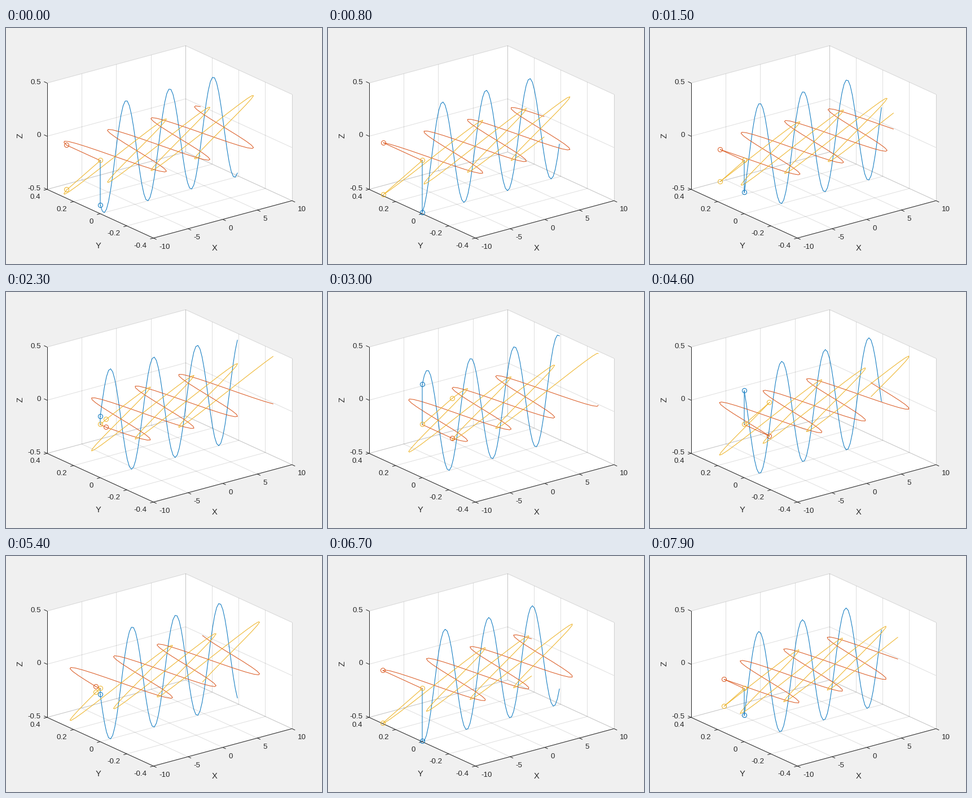
These frames come from a looping animation (560x420 px, 8 s). A matplotlib script:

```python
import numpy as np
import matplotlib.pyplot as plt
from matplotlib.animation import FuncAnimation

W, H, DPI = 560, 420, 100
PX = 72 / DPI                      # points per pixel
INK = "#262626"
BLUE, RED, YELLOW = "#0072BD", "#D95319", "#EDB120"
FRAMES, INTERVAL = 80, 100

plt.rcParams["font.family"] = "Liberation Sans"

# Orthographic view stretched to fill the plot box
AZ, EL = np.radians(37.5), np.radians(30)
LEFT, BOTTOM, BOX_W, BOX_H = 72.8, 373.8, 434, 342.3
horiz = np.array([np.cos(AZ), np.sin(AZ)])
vert = np.array([np.sin(AZ) * np.sin(EL), np.cos(AZ) * np.sin(EL), np.cos(EL)])
XW, YW = BOX_W * horiz / horiz.sum()
XH, YH, ZH = BOX_H * vert / vert.sum()


def project(x, y, z):
    u, v, w = (np.asarray(x) + 10) / 20, (np.asarray(y) + 0.4) / 0.8, np.asarray(z) + 0.5
    return LEFT + YW + u * XW - v * YW, BOTTOM - u * XH - v * YH - w * ZH


fig = plt.figure(figsize=(W / DPI, H / DPI), dpi=DPI, facecolor="#F0F0F0")
ax = fig.add_axes([0, 0, 1, 1])
ax.set_xlim(0, W)
ax.set_ylim(H, 0)
ax.axis("off")


def stroke(xs, ys, color=INK, **kw):
    return ax.plot(xs, ys, color=color, lw=PX, snap=False, **kw)[0]


def segment(a, b, **kw):
    (x0, y0), (x1, y1) = project(*a), project(*b)
    if abs(x0 - x1) < 1e-6:        # keep upright lines crisp
        x0 = x1 = np.floor(x0 + 0.25) + 0.5
    stroke([x0, x1], [y0, y1], solid_capstyle="butt", **kw)


def label(x, y, s, size=13.33, **kw):
    ax.text(x, y, s, fontsize=size * PX, color=INK, va="baseline", **kw)


def tick(x, y, dx, dy, length=6):
    k = length / np.hypot(dx, dy)
    stroke([x, x + dx * k], [y, y + dy * k], solid_capstyle="butt")


# White panes
outline = [(-10, 0.4, -0.5), (-10, -0.4, -0.5), (10, -0.4, -0.5),
           (10, -0.4, 0.5), (10, 0.4, 0.5), (-10, 0.4, 0.5)]
ax.fill(*project(*np.array(outline).T), color="white", lw=0)

# Grid on the floor and the two back walls
XT, YT, ZT = [-10, -5, 0, 5, 10], [0.4, 0.2, 0, -0.2, -0.4], [-0.5, 0, 0.5]
for x in XT:
    segment((x, -0.4, -0.5), (x, 0.4, -0.5), alpha=0.15)
    if x > -10:
        segment((x, 0.4, -0.5), (x, 0.4, 0.5), alpha=0.15)
for y in YT:
    segment((-10, y, -0.5), (10, y, -0.5), alpha=0.15)
    segment((10, y, -0.5), (10, y, 0.5), alpha=0.15)
for z in ZT:
    segment((-10, 0.4, z), (10, 0.4, z), alpha=0.15)
    segment((10, 0.4, z), (10, -0.4, z), alpha=0.15)

# Rulers, ticks and labels
segment((-10, 0.4, -0.5), (-10, 0.4, 0.5))
segment((-10, 0.4, -0.5), (-10, -0.4, -0.5))
segment((-10, -0.4, -0.5), (10, -0.4, -0.5))
for x in XT:
    px, py = project(x, -0.4, -0.5)
    tick(px, py, YW, YH)
    label(px + 10, py + 19, f"{x:g}", ha="left")
for y in YT:
    px, py = project(-10, y, -0.5)
    tick(px, py, -XW, XH)
    label(px - 11.7, py + 17.3, f"{y:g}", ha="right")
for z in ZT:
    px, py = project(-10, 0.4, z)
    tick(px, py, -YW, -YH)
    label(px - 11, py + 1.7, f"{z:g}", ha="right")
label(369.5, 396.5, "X", 14.67, ha="center")
label(163.5, 391.5, "Y", 14.67, ha="center")
label(30, 191.5, "Z", 14.67, ha="center", rotation=90, rotation_mode="anchor")

# Waves: vertical part, horizontal part and their sum
X = -10 + 0.3 * np.arange(67)
PARTS = [(BLUE, 0, 0.5), (RED, -0.3, 0), (YELLOW, -0.3, 0.5)]
waves, stems, rings = ([stroke([], [], c) for c, _, _ in PARTS] for _ in range(3))
turn = np.linspace(0, 2 * np.pi, 41)


def ring_at(x, y, r=4):
    """Circle centred on the pixel that holds (x, y)."""
    return (np.floor(x) + 0.5 + r * np.cos(turn),
            np.floor(y) + 0.5 + r * np.sin(turn))


stroke(*ring_at(*project(-10, 0, 0)), YELLOW)


def update(i):
    c = np.cos(X + 0.1 * i)
    for wave, stem, ring, (_, ay, az) in zip(waves, stems, rings, PARTS):
        wave.set_data(*project(X, ay * c, az * c))
        tip = np.array([0, c[0]])
        xs, ys = project([-10, -10], ay * tip, az * tip)
        stem.set_data(xs, ys)
        ring.set_data(*ring_at(xs[1], ys[1]))
    return waves + stems + rings


anim = FuncAnimation(fig, update, frames=FRAMES, interval=INTERVAL,
                     repeat=True, repeat_delay=0)
plt.show()
```
